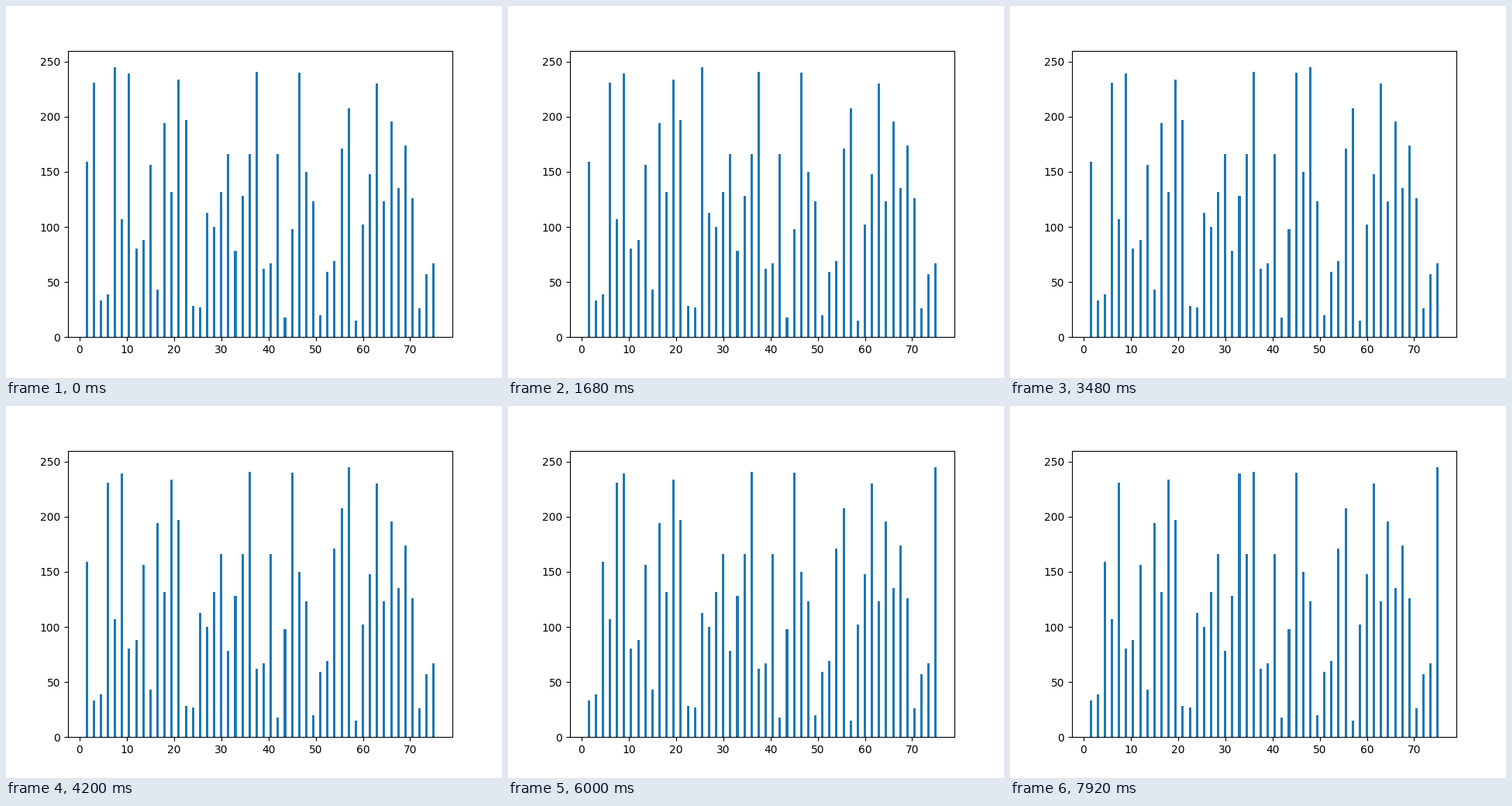
A matplotlib script that plays this animation: 640 by 480 pixels, repeating every 8000 ms.

```python
import matplotlib.pyplot as plt
import numpy as np
from matplotlib.animation import FuncAnimation

TICK = 40          # ms per drawn frame
HOLD = 3           # drawn frames per swap
FRAMES = 200

START = [
    159, 231, 33, 39, 245, 107, 239, 80, 88, 156,
    43, 194, 132, 234, 197, 28, 27, 113, 100, 132,
    166, 78, 128, 166, 241, 62, 67, 166, 18, 98,
    240, 150, 123, 20, 59, 69, 171, 208, 15, 102,
    148, 230, 123, 196, 135, 174, 126, 26, 57, 67,
]


def bubble_states(values, count):
    """Return the first `count` arrangements, one per swap."""
    data = list(values)
    states = [data[:]]
    for end in range(len(data) - 1, 0, -1):
        for j in range(end):
            if data[j] > data[j + 1]:
                data[j], data[j + 1] = data[j + 1], data[j]
                states.append(data[:])
                if len(states) == count:
                    return states
    return states


states = bubble_states(START, (FRAMES - 1) // HOLD + 1)

fig, ax = plt.subplots(figsize=(6.4, 4.8), dpi=100)
bars = ax.bar(1.5 * np.arange(1, len(START) + 1), START, width=0.5)
ax.set_ylim(0, 260)


def update(frame):
    for bar, height in zip(bars, states[frame // HOLD]):
        bar.set_height(height)
    return list(bars)


anim = FuncAnimation(fig, update, frames=FRAMES, interval=TICK,
                     init_func=lambda: update(0), repeat=True,
                     repeat_delay=0, blit=False)
plt.show()
```
